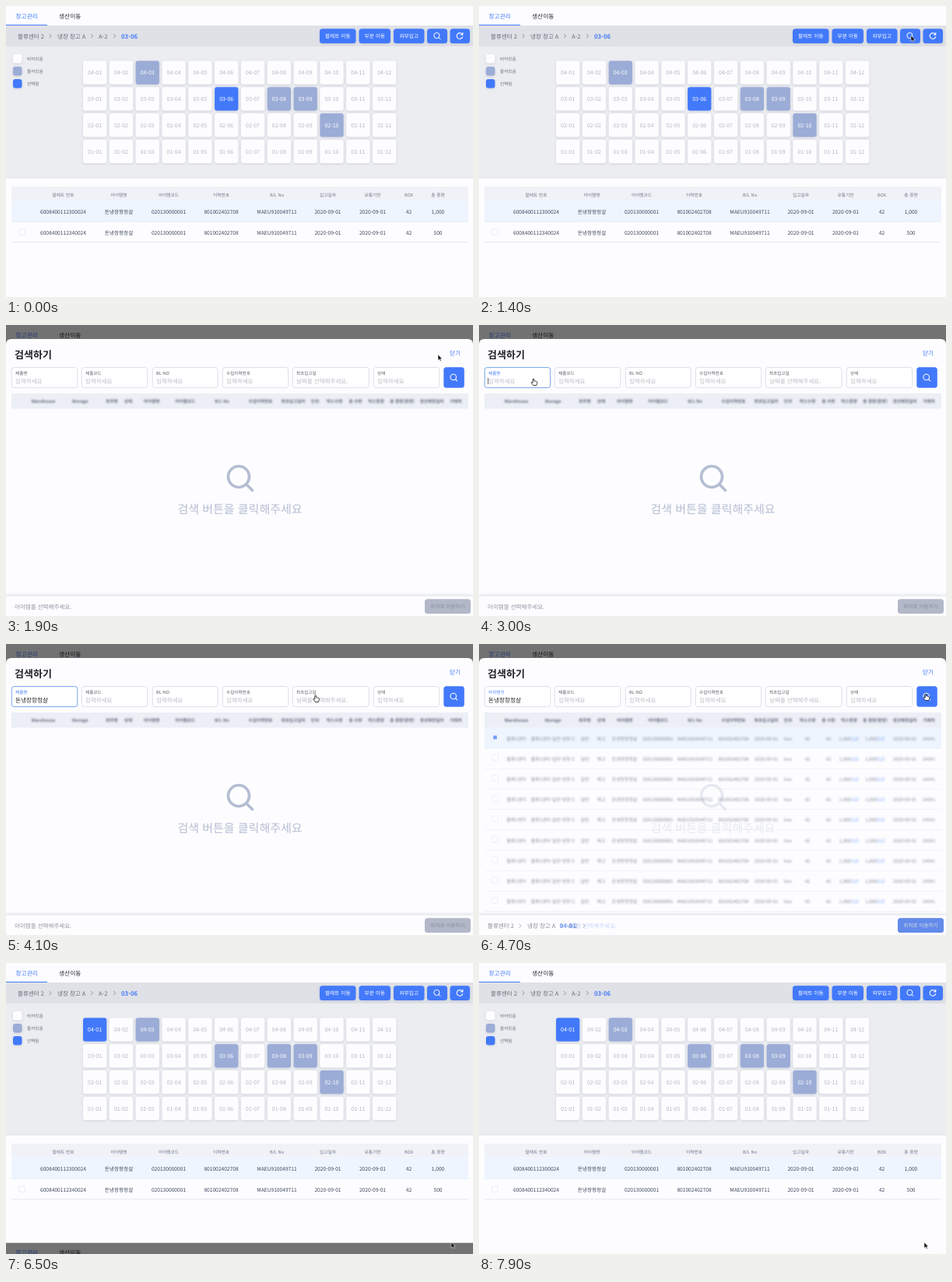
Write an HTML page that moves like this. It is 600 by 374 pixels and loops after 8000 ms.

```html
<!DOCTYPE html>
<html lang="ko">
<head>
<meta charset="utf-8">
<style>
  html, body { margin: 0; width: 100%; height: 100%; overflow: hidden; background: #fdfdff; }
  svg { display: block; width: 100vw; height: 100vh; }
  text { font-family: "Noto Sans CJK KR", "Noto Sans CJK", "Noto Sans", sans-serif; text-rendering: geometricPrecision; white-space: pre; }
  .blur { filter: blur(1.2px); }
  .soft { filter: drop-shadow(0 1px 1.5px rgba(60, 75, 120, .16)); }
  .up { filter: drop-shadow(0 -1px 2px rgba(40, 50, 80, .18)); }
</style>
</head>
<body>
<svg id="stage" viewBox="0 0 600 374"></svg>
<script>
const BLUE = '#4279fa', BUSY = '#9bacd6', WHITE = '#fdfdff', GREY = '#b9bcc5';

const rect = (x, y, w, h, fill, r = 0, more = '') =>
  `<rect x="${x}" y="${y}" width="${w}" height="${h}" rx="${r}" fill="${fill}" ${more}/>`;
const text = (x, y, s, size, fill, weight = 400, anchor = 'start', more = '') =>
  `<text x="${x}" y="${y}" font-size="${size}" fill="${fill}" font-weight="${weight}" text-anchor="${anchor}" ${more}>${s}</text>`;
const mid = (x, y, s, size, fill, weight = 400, more) => text(x, y, s, size, fill, weight, 'middle', more);
const line = (d, stroke, w = 1) =>
  `<path d="${d}" fill="none" stroke="${stroke}" stroke-width="${w}" stroke-linecap="round" stroke-linejoin="round"/>`;
const group = (id, body, more = '') => `<g id="${id}" ${more}>${body}</g>`;
const lens = (x, y, r, color, w) =>
  `<circle cx="${x}" cy="${y}" r="${r}" fill="none" stroke="${color}" stroke-width="${w}"/>` +
  line(`M${x + r * .74} ${y + r * .74}L${x + r * 1.3} ${y + r * 1.3}`, color, w);
const chevron = (x, y) => line(`M${x - 1.1} ${y - 2.2}l2.2 2.2l-2.2 2.2`, '#777c88', .8);

const tabs = () => text(12.5, 15.7, '창고관리', 7.7, BLUE, 500) + text(68, 15.7, '생산이동', 7.7, '#25272d', 500);

function cell(row, col) {
  const name = `0${4 - row}-${String(col + 1).padStart(2, '0')}`;
  const x = 99 + 33.82 * col, y = 70.5 + 33.8 * row;
  const busy = ['04-03', '03-08', '03-09', '02-10'].includes(name);
  return group('c' + name, rect(x, y, 30.3, 30.2, busy ? BUSY : WHITE, 3) +
    mid(x + 15.1, y + 17.8, name, 7, busy ? '#fff' : '#b5b8c1'), 'class="soft"');
}

function page() {
  let s = rect(0, 0, 600, 374, WHITE) + tabs() + rect(0, 24, 53, 1.2, BLUE) +
    rect(0, 25, 600, 196, '#ecedf1') + rect(0, 25.2, 600, 26.8, '#dfe1e7') + rect(0, 220.5, 600, 1, '#e3e4e9');
  s += text(15, 41.5, '물류센터 2', 7.5, '#666b77') + chevron(57, 38.7) + text(66, 41.5, '냉장 창고 A', 7.5, '#666b77') +
    chevron(110.5, 38.7) + text(119, 41.5, 'A-2', 7.5, '#666b77') + chevron(139.5, 38.7) +
    text(148, 41.5, '03-06', 7.7, BLUE, 700);
  [[403, 46.5, '팔레트 이동'], [453.5, 40.5, '부분 이동'], [498, 39.5, '외부입고'], [541, 26, ''], [570.5, 25.5, '']]
    .forEach(([x, w, label]) => {
      s += rect(x, 29.3, w, 18.7, BLUE, 3.5, 'class="soft"') + mid(x + w / 2, 41.1, label, 6.7, '#fff', 500);
    });
  s += lens(553.4, 38, 3.6, '#fff', 1) +
    line('M586.4 36.7A3.8 3.8 0 1 0 586.6 39.8M586.8 34.4V37H584.2', '#fff', 1.1);
  [['비어있음', WHITE], ['들어있음', BUSY], ['선택됨', BLUE]].forEach(([label, color], i) => {
    s += rect(9, 62 + 16 * i, 11.5, 11.5, color, 3, 'class="soft"') + text(27, 69.7 + 16 * i, label, 5.6, '#666b76');
  });
  for (let r = 0; r < 4; r++) for (let c = 0; c < 12; c++) s += cell(r, c);

  const cols = [73.5, 145, 209, 276.5, 348, 413.5, 471, 517.5, 555];
  const heads = ['팔레트 번호', '아이템명', '아이템코드', '이력번호', 'B/L No', '입고일자', '유통기한', 'BOX', '총 중량'];
  s += rect(7, 232, 587, 18.5, '#f0f2f7') + rect(7, 250.5, 587, 26.5, '#eef5ff') +
    rect(7, 276.7, 587, .7, '#dce5f2') + rect(7, 303, 587, .7, '#dfe2e8') +
    rect(17, 287, 7.2, 7.2, '#fff', 1, 'stroke="#e0e3ea" stroke-width=".7"');
  cols.forEach((x, i) => s += mid(x, 244.8, heads[i], 5.7, '#6d7386', 500));
  [['6008400112300024', '1,000'], ['6008400112340024', '500']].forEach(([id, total], r) =>
    [id, '돈냉장항정살', '020130000001', '801002402708', 'MAEU910049711', '2020-09-01', '2020-09-01', '42', total]
      .forEach((v, i) => s += mid(cols[i], 267.4 + 26.2 * r, v, 6.65, '#41485c')));
  return s;
}

const tableX = [48, 95, 136, 157, 187, 230, 277.5, 327, 369, 397, 422, 449, 475.5, 509, 547, 578];

function results() {
  const values = ['물류1센터', '물류1센터-일반-냉장-C', '일반', '재고', '돈냉장항정살', '020130000001', 'MAEU910049711',
    '801002402708', '2020-09-01', 'box', '42', '42', '1,000(12)', '1,000(12)', '2020-09-01', '24341'];
  let s = rect(7, 107.5, 587, 26.2, '#e9f2fe'), words = '';
  for (let r = 0; r < 9; r++) {
    const y = 120.3 + 26.2 * r;
    s += rect(7, y + 13.4, 587, .7, r ? '#e8eaf0' : '#d9e4f4');
    s += r ? rect(17, y - 4, 7.4, 7.4, '#fff', 1, 'stroke="#dde1e9" stroke-width=".7"') : rect(18.3, y - 2.6, 4.7, 4.7, BLUE);
    values.forEach((v, i) => words += mid(tableX[i], y + 3.3,
      v.replace('(12)', `<tspan fill="${BLUE}">(12)</tspan>`), 5.9, '#555b6b'));
  }
  return s + group('words', words);
}

function sheet() {
  let s = `<path d="M0 374V25Q0 18 7 18H593Q600 18 600 25V374Z" fill="${WHITE}"/>` +
    text(11, 42.5, '검색하기', 13, '#202228', 700) + text(570, 39.3, '닫기', 7.6, BLUE, 500);
  [[7, 85, '제품명'], [97, 85, '제품코드'], [188, 84.5, 'BL-NO'], [278, 85, '수입이력번호'], [368, 98.5, '최초입고일'], [472, 85, '상태']]
    .forEach(([x, w, label], i) => {
      s += rect(x + .3, 54.6, w - .6, 26, '#fff', 3, `stroke="#d5d8e0" stroke-width=".8" ${i ? '' : 'id="field"'}`) +
        text(x + 5, 63.8, label, 5.6, '#555a66', 500, 'start', i ? '' : 'id="label"') +
        text(x + 5, 74.6, i == 4 ? '날짜를 선택해주세요.' : '입력하세요', 7.5, GREY, 400, 'start', i ? '' : 'id="hint"');
    });
  s += text(12, 63.8, '아이템명', 5.6, BLUE, 500, 'start', 'id="label2"') +
    text(12, 74.6, '돈냉장항정살', 7.6, '#202228', 500, 'start', 'id="typed"') +
    rect(11.4, 68, .8, 8.2, '#333', 0, 'id="caret"') +
    rect(562.3, 54.3, 26.5, 26.5, BLUE, 3.5) + lens(574.7, 67, 3.8, '#fff', 1.1);
  s += group('results', results()) + rect(7, 88, 587, 19.5, '#eceff5');
  const heads = ['Warehouse', 'Storage', '화주명', '상태', '아이템명', '아이템코드', 'B/L No', '수입이력번호', '최초입고일자', '단위',
    '박스수량', '총 수량', '박스중량', '총 중량(중량)', '생산예정일자', '거래처'];
  s += group('heads', tableX.map((x, i) => mid(x, 100.2, heads[i], 5.6, '#5f6677', 700)).join(''), 'class="blur"');
  s += group('empty', lens(299, 195, 13.5, '#b4bdd2', 3.7) + mid(300.5, 241.6, '검색 버튼을 클릭해주세요', 15, '#b4bdd2', 500));
  s += rect(0, 348.5, 600, 26, WHITE, 0, 'class="up"') +
    group('crumbs', text(11, 365, '물류센터 2', 7.5, '#555a66') + chevron(53, 362.2) + text(62, 365, '냉장 창고 A', 7.5, '#555a66') +
      chevron(106, 362.2) + text(115, 365, 'A-2', 7.5, '#555a66') + chevron(135, 362.2)) +
    text(0, 365, '아이템을 선택해주세요.', 7.5, '#8f939e', 400, 'start', 'id="prompt"') +
    text(0, 365, '04-01', 7.7, BLUE, 700, 'start', 'id="place"');
  return s + rect(538, 352.3, 59, 18.8, '#b2b8c8', 3.5) + mid(567.5, 364.1, '위치로 이동하기', 6.6, '#858c9f', 500) +
    group('go', rect(538, 352.3, 59, 18.8, BLUE, 3.5) + mid(567.5, 364.1, '위치로 이동하기', 6.6, '#fff', 500));
}

const arrow = '<path id="arrow" d="M0 0V7.4L1.8 5.8L3 8.4L4.2 7.9L3.1 5.4H5.4Z" fill="#111" stroke="#fff" stroke-width=".5"/>';
const hand = '<path id="hand" d="M-.8 .6Q0-.6.8.6V3Q1.7 2.5 2.2 3.3Q3 2.9 3.5 3.6Q4.6 3.4 4.7 4.6V6.2L3.8 8.6H-.4L-2.8 5.4Q-3 4.2-1.8 4.5L-.8 5.3Z" fill="#fff" stroke="#111" stroke-width=".8" stroke-linejoin="round"/>';

document.getElementById('stage').innerHTML = page() +
  group('modal', group('backdrop', rect(0, 0, 600, 374, WHITE) + tabs()) +
    rect(0, 0, 600, 374, '#000', 0, 'id="dim"') + group('sheet', sheet())) +
  group('cursor', arrow + hand);

const $ = id => document.getElementById(id);
const set = (id, attrs) => { for (const k in attrs) $(id).setAttribute(k, attrs[k]); };
const show = (id, on) => set(id, { opacity: +on });
const ramp = (t, from, span) => Math.min(1, Math.max(0, (t - from) / span));
const easeOut = (t, from) => 1 - (1 - ramp(t, from, 300)) ** 1.7;

function paint(name, bg, ink) {
  const [box, label] = $('c' + name).children;
  box.setAttribute('fill', bg);
  label.setAttribute('fill', ink);
}

// time, x, y of the pointer
const route = [[190, 598, 285], [900, 555, 38], [2250, 555, 38], [2900, 70, 69], [3650, 70, 69],
  [4400, 574, 64], [5350, 574, 64], [5980, 572, 359], [8000, 572, 359]];

function pointer(t) {
  const i = Math.max(1, route.findIndex(k => k[0] > t));
  const [a, b] = [route[i - 1], route[i]];
  const u = ramp(t, a[0], b[0] - a[0]), e = u * u * (3 - 2 * u);
  return `translate(${a[1] + (b[1] - a[1]) * e} ${a[2] + (b[2] - a[2]) * e})`;
}

function draw(t) {
  const open = easeOut(t, 1440), close = easeOut(t, 6245), found = easeOut(t, 4548);
  const moved = t > 2000, focus = t >= 2900, typed = t >= 3600, lit = focus && t < 4548;

  paint('04-01', moved ? BLUE : WHITE, moved ? '#fff' : '#b5b8c1');
  paint('03-06', moved ? BUSY : BLUE, '#fff');

  set('modal', { transform: `translate(0 ${374 * close})`, visibility: open > 0 && close < 1 ? 'visible' : 'hidden' });
  show('backdrop', moved);
  show('dim', 1);
  set('dim', { 'fill-opacity': .55 * open });
  set('sheet', { transform: `translate(0 ${356 * (1 - open)})` });

  set('field', { stroke: lit ? '#5590e8' : '#d5d8e0' });
  set('label', { fill: focus ? BLUE : '#555a66', opacity: 1 - found });
  show('label2', found);
  show('hint', !typed);
  show('typed', typed);
  show('caret', focus && !typed);

  set('results', { opacity: found });
  $('words').style.filter = `blur(${.4 + .9 * found}px)`;
  set('empty', { opacity: 1 - found });
  set('crumbs', { opacity: found });
  set('go', { opacity: found });
  const x = 11 + 132 * found;
  set('prompt', { x, opacity: 1 - found, fill: found > 0 ? BLUE : '#8f939e' });
  set('place', { x, opacity: found });

  const overField = t >= 2400 && t < 6400;
  set('cursor', { transform: pointer(t), opacity: +(t >= 190) });
  show('arrow', !overField);
  show('hand', overField);
}

function tick() {
  draw(performance.now() % 8000);
  requestAnimationFrame(tick);
}
tick();
</script>
</body>
</html>
```
